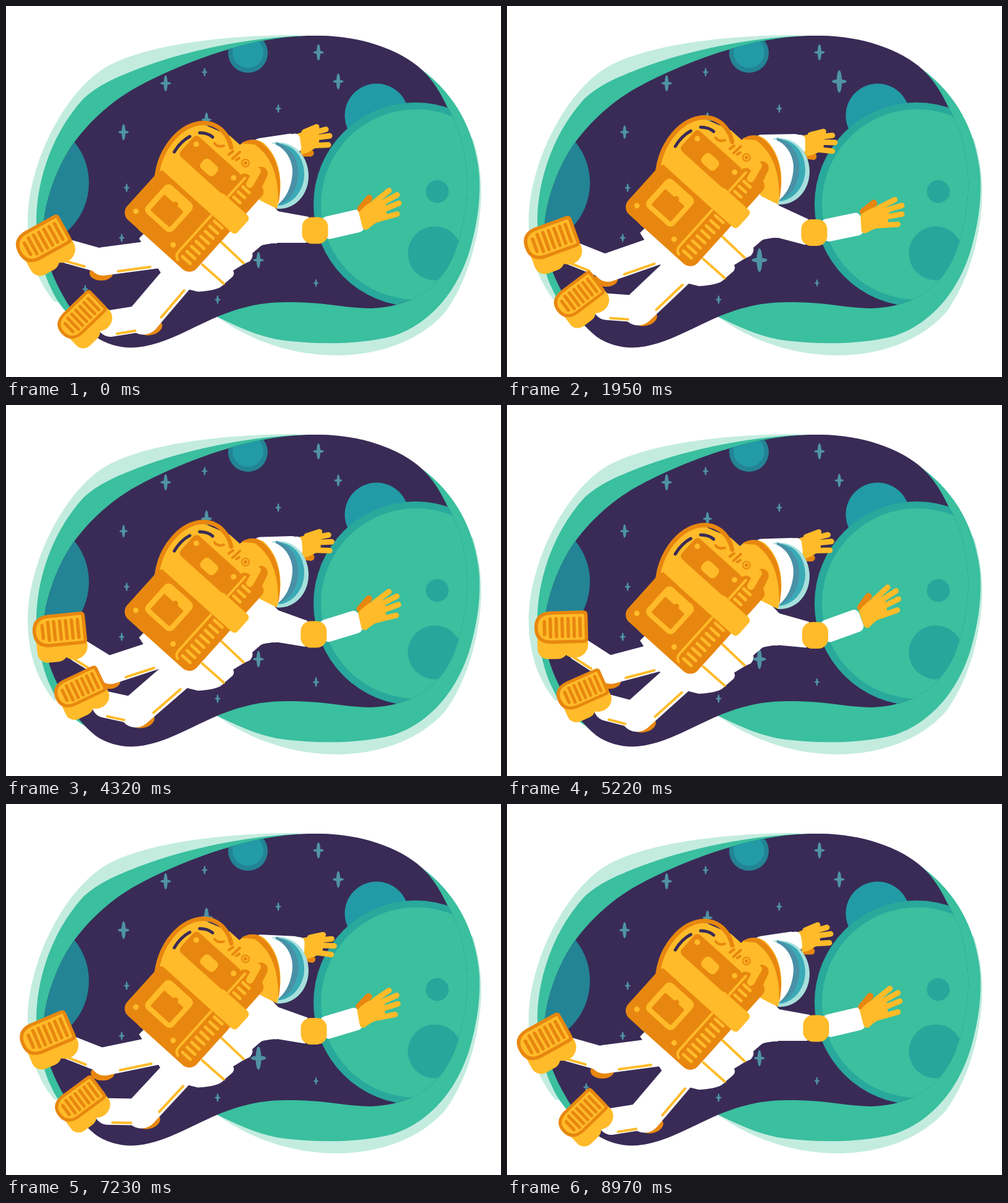
Write an HTML page that moves like this. It is 800 by 600 pixels and loops after 9 s.

```html
<!DOCTYPE html>
<html lang="en">
<head>
<meta charset="utf-8">
<title>Drifting astronaut</title>
<style>
html, body { margin: 0; width: 100%; height: 100%; overflow: hidden; background: #fff; }
svg { display: block; width: 800px; height: 600px; }
.y { fill: #ffbb29; }
.d { fill: #e8870f; }
.w { fill: #fff; }
.yl, .dl, .wl, .nl { fill: none; stroke-linecap: round; stroke-linejoin: round; }
.yl { stroke: #ffbb29; stroke-width: 4; }
.dl { stroke: #e8870f; stroke-width: 4; }
.wl { stroke: #fff; }
.nl { stroke: #392b56; stroke-width: 5; }
</style>
</head>
<body>
<svg viewBox="0 0 800 600" xmlns="http://www.w3.org/2000/svg">
  <defs>
    <path id="space" d="M505 48C455 47 400 57 360 70C310 84 245 112 210 132C165 157 128 194 105 228C80 266 64 315 61 350C58 392 70 428 92 468C105 492 122 517 145 535C165 549 190 554 212 552C252 548 290 526 325 510C365 491 405 479 452 479C515 478 545 489 590 489C650 487 700 460 724 402C743 350 748 305 744 262C739 215 728 190 714 165C701 138 690 120 672 103C635 69 570 48 505 48Z"/>
    <clipPath id="window"><use href="#space"/></clipPath>
  </defs>

  <path fill="#c3ecdf" d="M470 47C380 47 250 57 175 92C100 125 38 250 35 340C34 410 55 450 78 478L340 502C400 545 470 566 540 565C610 563 670 540 710 495C750 440 768 360 768 300C768 265 762 240 755 215L600 100Z"/>
  <path fill="#3abf9f" d="M505 48C400 47 280 74 200 107C165 121 145 132 125 150C75 205 50 280 49 345C50 390 60 430 72 455C85 485 105 508 135 523L340 502C375 519 410 536 450 541C510 548 575 547 625 534C680 516 725 470 748 400C763 350 767 310 765 275C760 215 735 150 672 103Z"/>
  <use href="#space" fill="#392b56"/>
  <g clip-path="url(#window)">
    <circle cx="29" cy="286" r="105" fill="#238495"/>
    <circle cx="391" cy="76" r="32" fill="#238495"/>
    <circle cx="391" cy="75" r="25" fill="#229ba6"/>
    <circle cx="599" cy="177" r="51.5" fill="#229ba6"/>
    <circle cx="662" cy="321" r="165" fill="#29a89c"/>
    <circle cx="663" cy="321" r="154" fill="#3abf9f"/>
    <circle cx="697" cy="300" r="18.5" fill="#27a69b"/>
    <circle cx="693" cy="400" r="43.5" fill="#27a69b"/>
  </g>
  <g id="stars" fill="#4f93a4"></g>

  <path id="farSleeve" class="wl" stroke-width="29"/>
  <g id="farHand">
    <path class="dl" style="stroke-width:11" d="M482 238L492 238"/>
    <path class="y" d="M470 207L492 199L506 208L506 224Q492 238 477 240Z"/>
    <path class="yl" style="stroke-width:9" d="M482 204L502 195.500M490 207L517 199.500M494 214L523 210M492 226L521 224.500"/>
    <rect class="w" x="436" y="205" width="40" height="31" rx="8" transform="rotate(-9 476 220)"/>
  </g>

  <g id="leg1"></g>
  <g id="boot1"></g>
  <g id="leg2"></g>
  <g id="boot2"></g>

  <path id="upperArm" class="w"/>
  <g id="forearm"><rect class="w" x="13" y="-18" width="66" height="37" rx="9"/></g>
  <g id="hand">
    <path class="dl" style="stroke-width:11" d="M573 328L587 311"/>
    <path class="y" d="M570 334Q582 320 597 313L614 320L616 341Q596 350 585 361Q578 364 576 357Z"/>
    <path class="yl" style="stroke-width:9" d="M596 317L619 298.500M600 323L632 305.500M603 332L635 319M598 346L632 336.500"/>
  </g>
  <rect id="elbow" class="y" x="-21" y="-21.500" width="42" height="43" rx="16"/>

  <g id="torso">
    <path class="w" d="M215 376L260 330L415 305L440 332L438 384Q420 383 412 388L398 400Q400 406 394 413L385 417L367 428Q370 433 366 438L352 450Q345 460 310 462L262 450Z"/>
    <path class="yl" d="M348 382L384 416M317 418L352 449"/>
  </g>

  <g id="head">
    <path fill="#a6e0dc" d="M430 221C468 216 489 245 489 275C489 306 466 330 438 328Z"/>
    <path fill="#3aaab6" d="M438 222C470 224 482.500 250 482 274C481 302 460 322 440 323Z"/>
    <path fill="#4a90a6" d="M436 220C464 228 473 253 472.500 272C471 298 456 318 440 321Z"/>
    <path class="w" d="M418 221C449 220 463 248 463 268C462 293 452 312 438 322Z"/>
    <path class="y" d="M376 226Q396 210 416 221C436 238 446 268 443 300L438 328L410 314Z"/>
    <path class="d" d="M380 222Q392 214 406 217C434 232 450 270 440 322C441 276 430 244 402 224Z"/>
  </g>

  <g id="pack">
    <path class="y" d="M206 345Q208 360 226 371L245 385L262 350Z"/>
    <path class="y" d="M240 276C246 240 272 198 316 190L362 210L413 256Q424 270 410 305L386 335L320 330Z"/>
    <path class="dl" style="stroke-width:22" d="M412 271L400 296"/>
    <g id="box" transform="translate(305 310) rotate(42)">
      <rect class="d" x="-72" y="-4" width="151" height="103" rx="16"/>
      <rect class="d" x="30" y="-86" width="49" height="120" rx="12"/>
      <rect class="y" x="-76" y="-36" width="112" height="38" rx="4"/>
      <rect class="y" x="-40" y="-36" width="129" height="38" rx="7"/>
      <rect class="d" x="-67" y="-78" width="100" height="44" rx="7"/>
      <rect class="y" x="-30" y="-62" width="29" height="20" rx="7"/>
      <rect class="y" x="-49" y="10" width="59" height="61" rx="9"/>
      <rect class="d" x="-40" y="29" width="42" height="34" rx="2"/>
      <g class="y">
        <circle cx="-56" cy="80" r="4.500"/><circle cx="25" cy="80" r="4.500"/>
        <circle cx="-56" cy="-66" r="4.500"/><circle cx="25" cy="-66" r="4.500"/>
      </g>
      <circle class="d" cx="-16" cy="29" r="4.500"/>
      <path class="yl" d="M39 4V82Q39 91 47 93M39 -38V-78"/>
      <path id="vents" class="yl" style="stroke-width:5"/>
    </g>
    <path class="yl" style="stroke-width:12" d="M394 288L406 267"/>
    <path class="dl" style="stroke-width:7" d="M244 272C250 232 280 190 320 189C346 190 360 210 364 229"/>
    <path class="nl" d="M272 236Q282 219 297 211M313 205Q326 205 334 212"/>
    <path class="dl" d="M337 222Q342 229 352 226M360 240L367 235M366 247L378 236M372 249L377 246"/>
    <circle class="dl" cx="387" cy="254" r="6" style="stroke-width:2"/>
    <circle class="d" cx="387" cy="254" r="3"/>
  </g>
</svg>
<script>
const $ = id => document.getElementById(id);
const LOOP = 9000;
const times = [0, 1950, 3450, 5220, 6420, 8130];

// One pose per key time: x, y and, where there is a third value, the angle.
const tracks = {
  body:    [[0], [-9], [-6], [5], [-3], [-2.5]],
  head:    [[0], [-7], [-4], [2], [-5], [-4]],
  farHand: [[475, 220, 0], [481, 223, 9], [480, 225, 9], [476, 229, 2], [481, 230, 11], [480, 229, 8]],
  elbow:   [[499.5, 363], [496.5, 366.5], [496.5, 369], [498, 372.5], [497, 370], [498.5, 364.5]],
  hand:    [[577, 345, 0], [576, 350, 12], [574, 350, 9], [576.5, 344, -4], [572, 345, 6], [576, 344, 1]],
  boot1:   [[58, 379, -29], [70, 377, -20], [81, 370, -13], [87.5, 359.5, -1.5], [71, 367, -17], [60, 378, -28]],
  boot2:   [[120, 502, -44], [114, 469, -37], [115, 457, -29], [120, 462, -24], [117.5, 470, -31], [118, 491, -42]],
  knee1:   [[157, 413], [163, 423], [168, 427], [168, 428], [162, 420], [157, 413]],
  knee2:   [[222, 505], [212, 490], [210, 488], [210, 502], [216, 497], [221, 501]]
};

// x, y, then half height: either fixed or one per key time
const stars = [
  [505, 75, 13], [258, 125, 13], [321, 107, 7], [440, 166, 7], [195, 294, 7],
  [187, 375, 7], [128, 458, 7], [342, 475, 7],
  [537, 122, 13, 18, 10, 11, 12.5, 14],
  [408, 411, 13, 19, 12, 16, 20, 16],
  [324, 184, 12, 12, 16, 11, 15, 16],
  [190, 204, 13, 11, 10, 11, 13, 15],
  [501, 448, 6.5, 6, 9, 6.5, 6, 6.5]
];

// Smooth cyclic curve through the key values.
function sample(values, t) {
  const n = times.length;
  const at = i => times[(i + n) % n] + Math.floor(i / n) * LOOP;
  const val = i => values[(i + n) % n];
  const slope = i => (val(i + 1) - val(i - 1)) / (at(i + 1) - at(i - 1));
  let i = n - 1;
  while (times[i] > t) i--;
  const h = at(i + 1) - at(i), s = (t - at(i)) / h, r = 1 - s;
  return val(i) * (1 + 2 * s) * r * r + slope(i) * h * s * r * r +
         val(i + 1) * s * s * (3 - 2 * s) - slope((i + 1) % n) * h * s * s * r;
}

const pose = (name, t) => tracks[name][0].map((_, k) => sample(tracks[name].map(p => p[k]), t));
const set = (id, attr, value) => $(id).setAttribute(attr, value);
const move = (id, x, y, angle = 0, rest = '') =>
  set(id, 'transform', `translate(${x} ${y}) rotate(${angle}) ${rest}`);

function local([x, y, angle], dx, dy) {
  const a = angle * Math.PI / 180, c = Math.cos(a), s = Math.sin(a);
  return [x + dx * c - dy * s, y + dx * s + dy * c];
}

// Line beside the limb a-b, between the shares s and e of its length.
function seam(a, b, s, e, off) {
  const dx = b[0] - a[0], dy = b[1] - a[1], len = Math.hypot(dx, dy);
  const p = k => `${a[0] + dx * k - dy / len * off} ${a[1] + dy * k + dx / len * off}`;
  return `M${p(s)}L${p(e)}`;
}

function legMarkup(id, thigh, shin) {
  return `<ellipse id="${id}pad" class="d" rx="19" ry="12"/>
    <path id="${id}thigh" class="wl" stroke-width="${thigh}"/>
    <path id="${id}shin" class="wl" stroke-width="${shin}"/>
    <path id="${id}seam" class="yl"/>`;
}

function drawLeg(id, hip, knee, ankle, pad, thighSeam, shinSeam) {
  set(id + 'pad', 'transform', `translate(${knee[0] + pad[0]} ${knee[1] + pad[1]}) rotate(${pad[2]})`);
  set(id + 'thigh', 'd', `M${knee}L${hip}`);
  set(id + 'shin', 'd', `M${ankle}L${knee}`);
  set(id + 'seam', 'd', seam(knee, hip, ...thighSeam) + seam(ankle, knee, ...shinSeam));
}

function bootMarkup() {
  let slots = '';
  for (let i = 0; i < 7; i++) {
    const trim = i === 0 ? 4 : 0;
    slots += `M${-27 + i * 9.6} ${-14 + trim}V${15 - trim}`;
  }
  return `<rect class="y" x="-39" y="-4" width="50" height="55" rx="17"/>
    <circle class="y" cx="21" cy="28" r="22"/>
    <path class="y" stroke="#e8870f" stroke-width="5.500" d="M-18 -23.500H36Q40.500 -23.500 40.500 -19V19Q40.500 23.500 36 23.500H-18Q-40.500 22 -40.500 0Q-40.500 -22 -18 -23.500Z"/>
    <path class="dl" style="stroke-width:5.500" d="${slots}"/>`;
}

$('leg1').innerHTML = legMarkup('leg1', 46, 39);
$('leg2').innerHTML = legMarkup('leg2', 53, 43);
$('boot1').innerHTML = $('boot2').innerHTML = bootMarkup();
$('stars').innerHTML = stars.map((_, i) =>
  `<g id="star${i}"><ellipse rx=".24" ry="1"/><ellipse rx=".66" ry=".2"/></g>`).join('');

let vents = '';
for (let i = 0; i < 8; i++) vents += `M49 ${7 + i * 11}H66`;
for (let i = 0; i < 3; i++) vents += `M46 ${-43 - i * 11}H60`;
set('vents', 'd', vents);

function draw(t) {
  const [dy] = pose('body', t);
  const [headY] = pose('head', t);
  move('torso', 0, dy);
  move('pack', 0, dy);
  move('head', 0, headY);

  const far = pose('farHand', t);
  move('farHand', ...far, 'translate(-475 -220)');
  set('farSleeve', 'd', `M${412} ${228 + dy * 0.6}L${local(far, -16, 1)}`);

  const [ex, ey] = pose('elbow', t), hand = pose('hand', t);
  const reach = Math.atan2(hand[1] - ey, hand[0] - ex) * 180 / Math.PI;
  move('elbow', ex, ey);
  move('forearm', ex, ey, reach);
  move('hand', ...hand, 'translate(-577 -345)');
  set('upperArm', 'd', `M415 ${318 + dy}L440 ${332 + dy}L${ex - 10} ${ey - 22}L${ex - 14} ${ey + 20}L${435} ${383 + dy}L400 ${389 + dy}Z`);

  const boot1 = pose('boot1', t), boot2 = pose('boot2', t);
  move('boot1', ...boot1);
  move('boot2', ...boot2, 'scale(.95 .88)');
  drawLeg('leg1', [255, 400 + dy], pose('knee1', t), local(boot1, 28, 36),
    [-3, 19, 0], [0.22, 0.75, 19], [0, 0.55, 16]);
  drawLeg('leg2', [290, 425 + dy], pose('knee2', t), local(boot2, 27, 42),
    [12, 15, -15], [0.19, 0.73, 21], [0.15, 0.7, 18]);

  stars.forEach(([x, y, ...sizes], i) => {
    const size = sizes.length > 1 ? sample(sizes, t) : sizes[0];
    move('star' + i, x, y, 0, `scale(${size})`);
  });
}

function tick() {
  draw(performance.now() % LOOP);
  requestAnimationFrame(tick);
}
tick();
</script>
</body>
</html>
```
